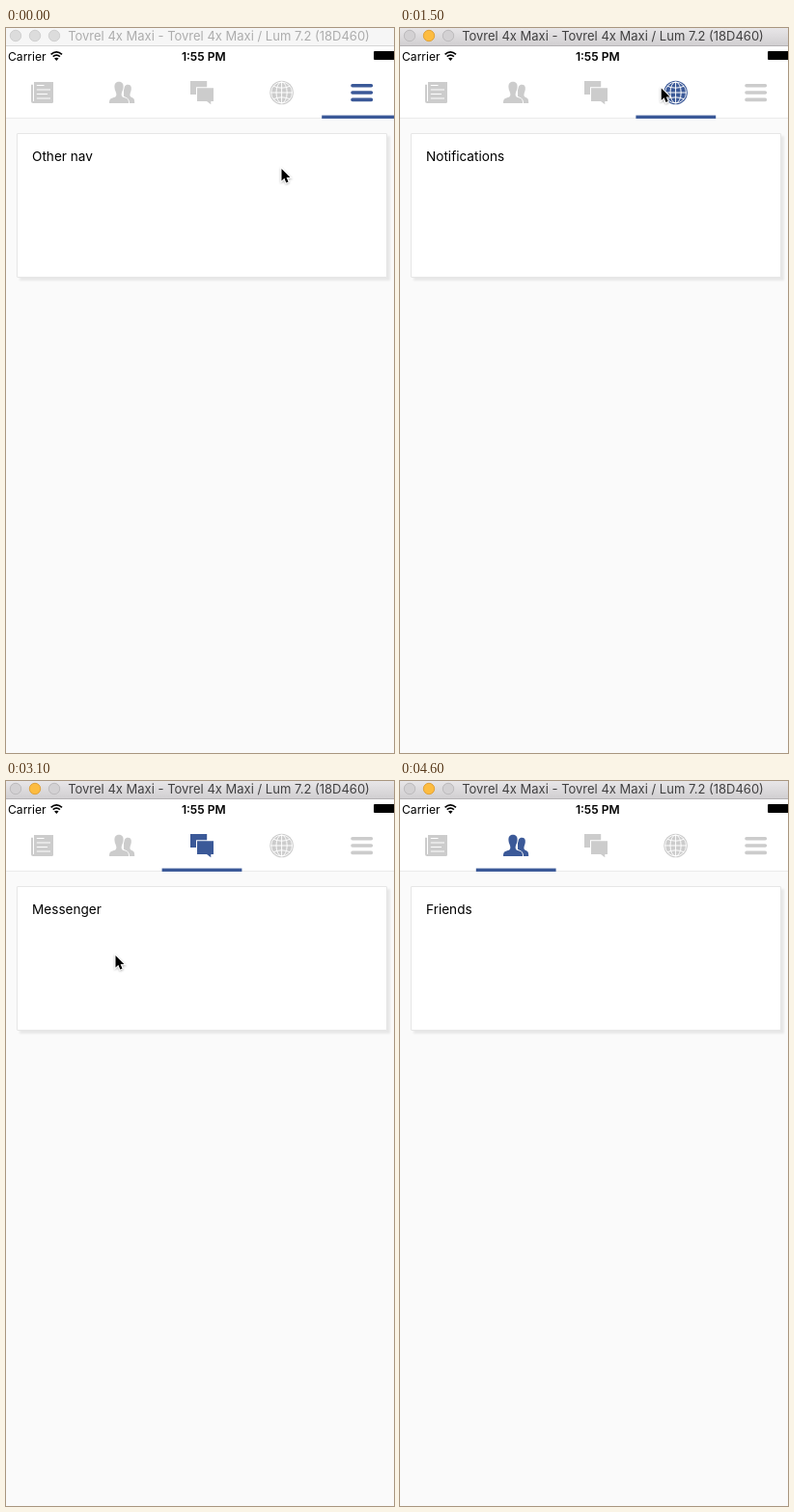
Write an HTML page that moves like this. It is 402 px wide and 752 px high and loops after 4900 ms.

```html
<!DOCTYPE html>
<html lang="en">
<head>
<meta charset="utf-8">
<title>Swipeable tabs</title>
<style>
html, body { margin: 0; width: 100%; height: 100%; overflow: hidden; background: #fafafa; }
svg { display: block; width: 402px; height: 752px; font-family: Inter, Roboto, sans-serif; }
.icon { fill: currentColor; }
.icon .cut { fill: none; stroke: #fff; }
.icon .gap { stroke: #fff; stroke-width: 2; paint-order: stroke; }
</style>
</head>
<body>
<svg viewBox="0 0 402 752">
  <defs>
    <linearGradient id="chrome" x2="0" y2="1">
      <stop offset="0" stop-color="#e8e6e8"/>
      <stop offset="1" stop-color="#d1cfd1"/>
    </linearGradient>
    <filter id="soft" x="-5%" y="-10%" width="110%" height="120%">
      <feGaussianBlur stdDeviation="1.2"/>
    </filter>
    <filter id="drop" x="-50%" y="-50%" width="200%" height="200%">
      <feDropShadow dx="0" dy="1" stdDeviation="0.8" flood-opacity=".35"/>
    </filter>
  </defs>

  <rect width="402" height="752" fill="#fafafa"/>
  <g id="pages"></g>

  <rect y="18" width="402" height="75" fill="#fff"/>
  <rect y="93" width="402" height="1" fill="#ebebeb"/>

  <g class="icon">
    <path d="M29 56H49V76.5Q49 78 47.5 78H28Q26 78 26 76V58.7H28V76H29Z"/>
    <path class="cut" d="M31.8 59.5H39.5M31.8 64H46M31.8 68.5H43M31.8 73H46"/>
  </g>
  <g class="icon">
    <path d="M126.3 58.7C129 58.7 130.2 60.6 129.8 63.5C129.6 66 128.5 67.3 128.4 69.5C128.5 71.5 130 71.8 131.3 72.4C133 73.3 133.2 75 133.2 78H122V65C122 61 123.5 58.7 126.3 58.7Z"/>
    <path class="gap" d="M117 55.8C120.5 55.8 122 58.3 121.5 62C121.3 65 119.7 66.3 119.6 69C119.7 71.5 121.2 71.8 123.6 72.6C126.5 73.6 127 75 127 78H107C107 75 107.5 73.6 110.4 72.6C112.8 71.8 114.3 71.5 114.4 69C114.3 66.3 112.7 65 112.5 62C112 58.3 113.5 55.8 117 55.8Z"/>
  </g>
  <g class="icon">
    <path d="M191 55H208.2V69H191Z"/>
    <path class="gap" d="M198 62.2H215V76H212.3V79.3L208 76H198Z"/>
  </g>
  <g class="icon">
    <circle cx="285.6" cy="67" r="12.3"/>
    <g class="cut">
      <circle cx="285.6" cy="67" r="10.9" stroke-width=".9"/>
      <ellipse cx="285.6" cy="67" rx="5.6" ry="11"/>
      <path d="M285.6 56V78M274.5 67H296.7M277 60.3Q285.6 64 294.2 60.3M277 73.7Q285.6 70 294.2 73.7"/>
    </g>
  </g>
  <g class="icon">
    <path d="M359 59.7H378.4M359 67H378.4M359 74.4H378.4" stroke="currentColor" stroke-width="3.6" stroke-linecap="round"/>
  </g>
  <rect id="bar" y="90.6" width="82.8" height="3.4" fill="#3b5998"/>

  <g font-size="12.1">
    <text x="2" y="34">Carrier</text>
    <text x="204.8" y="33.8" text-anchor="middle" font-weight="600">1:55 PM</text>
    <rect x="381" y="24" width="24" height="9" rx="1"/>
    <path d="M46.6 27.3Q52.3 22.3 58 27.3M48.7 29.7Q52.3 26.5 55.9 29.7" fill="none" stroke="#000" stroke-width="1.7"/>
    <path d="M52.3 34L50 31.5Q52.3 29.8 54.6 31.5Z"/>
  </g>

  <rect id="head" width="402" height="18"/>
  <rect id="edge" y="18" width="402" height="1"/>
  <g id="buttons">
    <circle cx="10" cy="8" r="5.7"/>
    <circle cx="30" cy="8" r="5.7"/>
    <circle cx="50" cy="8" r="5.7"/>
  </g>
  <text id="title" x="220.5" y="13" font-size="13" text-anchor="middle">Tovrel 4x Maxi - Tovrel 4x Maxi / Lum 7.2 (18D460)</text>

  <g id="cursor" filter="url(#drop)">
    <path d="M.5 1V13.4L3.4 10.7L5.3 15.4L7.5 14.4L5.6 9.9H9.4Z" stroke="#fff" stroke-width="1.8" paint-order="stroke"/>
  </g>
</svg>
<script>
const LOOP = 4900, STEP = 100, PAGE = 414, TAB = 82.8, LEFT = -4;
const LAG = 18;   // the underline trails the pages
const FOCUS = 1000, EXIT = 4600;
const labels = ["News", "Friends", "Messenger", "Notifications", "Other nav"];

// two taps, then a swipe
const turns = [
  { start: 1184, span: 300, tap: 3 },
  { start: 2249, span: 300, tap: 2 },
  { start: 3195, span: 540 }
];

const home = { x: 285, y: 145 };
const moves = [
  { start: 200, end: 800, x: 276, y: 62 },
  { start: 1400, end: 2000, x: 190, y: 55.5 },
  { start: 2700, end: 3100, x: 113, y: 180 },
  { start: 3200, end: 3500, x: 345, y: 191 },
  { start: 3700, end: 3900, x: 338, y: 206 },
  { start: 3900, end: EXIT, x: 32, y: -27 }
];

const $ = id => document.getElementById(id);
const icons = [...document.querySelectorAll(".icon")];
const buttons = [...$("buttons").children];
const clamp = x => Math.min(1, Math.max(0, x));
const ease = u => (1 - Math.cos(Math.PI * clamp(u))) / 2;

const position = t =>
  turns.reduce((pos, { start, span }) => pos - ease((t - start) / span), labels.length - 1);

function pointer(t) {
  return moves.reduce((p, m) => {
    const u = ease((t - m.start) / (m.end - m.start));
    return { x: p.x + (m.x - p.x) * u, y: p.y + (m.y - p.y) * u };
  }, home);
}

// touch feedback: dims quickly, then recovers after release
function touchOpacity(tab, t) {
  const turn = turns.find(({ tap }) => tap === tab);
  if (!turn) return 1;
  const s = t - turn.start;
  return 1 - 0.8 * (ease((s + 150) / 130) - ease((s - 60) / 250));
}

function tint(k) {
  const mix = c => Math.round(c + (204 - c) * k);
  return `rgb(${mix(59)},${mix(89)},${mix(152)})`;
}

const pages = labels.map(label => {
  $("pages").insertAdjacentHTML("beforeend", `<g>
    <rect x="14" y="112" width="384" height="150" opacity=".07" filter="url(#soft)"/>
    <rect x="11.5" y="109.5" width="383" height="149" rx=".5" fill="#fff" stroke="#e6e6e6"/>
    <text x="27" y="138" font-size="13.6">${label}</text></g>`);
  return $("pages").lastElementChild;
});

function drawWindow(active) {
  $("head").setAttribute("fill", active ? "url(#chrome)" : "#f6f6f6");
  $("edge").setAttribute("fill", active ? "#b4b2b4" : "#d6d6d6");
  $("title").setAttribute("fill", active ? "#414041" : "#adadad");
  buttons.forEach((button, i) => {
    const amber = active && i === 1;
    button.setAttribute("fill", amber ? "#fdbc40" : active ? "#d3d1d3" : "#dcdcdc");
    button.setAttribute("stroke", amber ? "#e0a23a" : active ? "#bdbbbd" : "#d0d0d0");
  });
}

function draw(t) {
  const pos = position(t), late = position(t - LAG);
  pages.forEach((page, i) =>
    page.setAttribute("transform", `translate(${Math.round((i - pos) * PAGE)})`));
  $("bar").setAttribute("x", LEFT + late * TAB);

  // an icon loses its tint only towards the tab on its right
  icons.forEach((icon, i) => {
    const away = late - i;
    icon.style.color = tint(away > -1e-6 ? clamp(away) : 1);
    icon.style.opacity = touchOpacity(i, t);
  });

  drawWindow(t >= FOCUS);
  const { x, y } = pointer(t);
  $("cursor").setAttribute("transform", `translate(${x} ${y})`);
  $("cursor").style.display = t < EXIT ? "" : "none";
}

const begin = performance.now();
function tick() {
  const t = (performance.now() - begin) % LOOP;
  draw(Math.floor(t / STEP) * STEP);
  requestAnimationFrame(tick);
}
tick();
</script>
</body>
</html>
```
